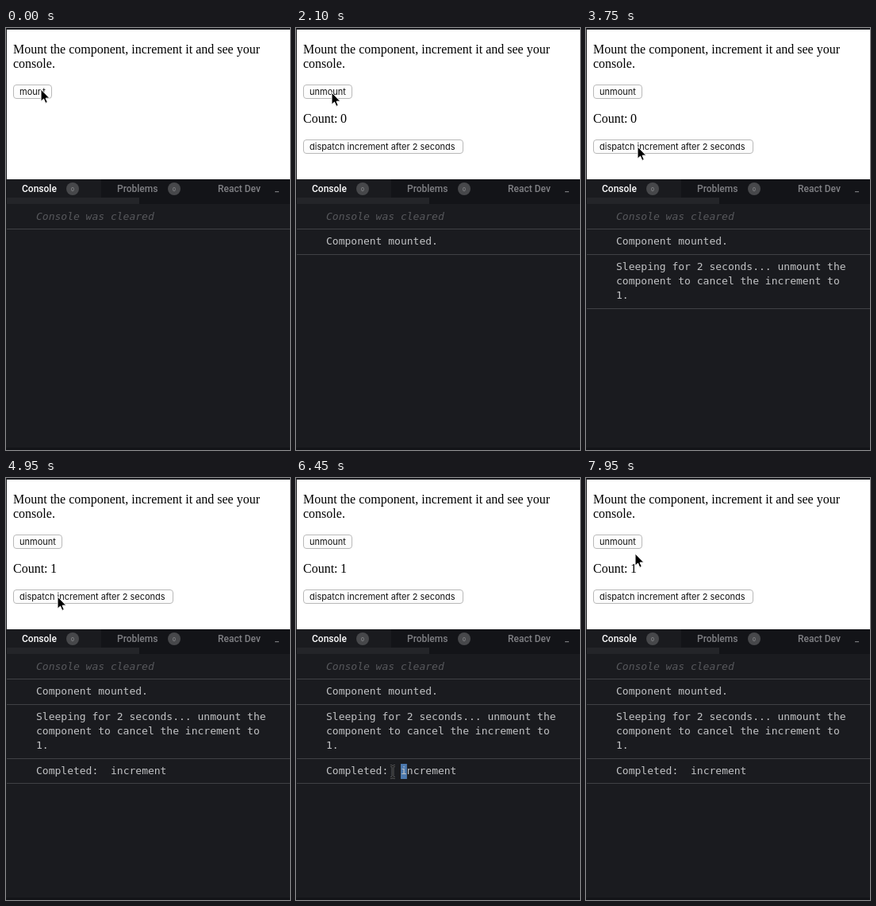
An HTML page that plays this animation: 358 by 530 pixels, repeating every 8000 ms.

```html
<!DOCTYPE html>
<html lang="en">
<head>
<meta charset="utf-8">
<title>Mount and increment</title>
<style>
html, body { margin: 0; width: 100%; height: 100%; overflow: hidden; background: #1a1b1f; }
svg { display: block; }

.page { font: 16px "Liberation Serif", serif; fill: #000; }
.label { font: 11px Inter, sans-serif; fill: #111; }
.tab { font: 500 12px Roboto, sans-serif; fill: #808185; }
.badge { font: 7px Roboto, sans-serif; fill: #929396; text-anchor: middle; }
.log { font: 13px "DejaVu Sans Mono", monospace; fill: #c3c4c6; }
.cleared { font-style: italic; fill: #57585c; }
.rule { fill: #404145; }
.btn { fill: url(#plain); stroke: #b9b9b9; }
.btn.blue { fill: url(#pressed); stroke: #2a5fd0; }
.sel { fill: #4b78ad; transform-box: fill-box; }

/* One 8 s clock for everything: 1% = 80 ms */
.anim { animation: 8s step-end infinite; }
.before { animation-name: before; }
.mountPress { animation-name: mountPress; }
.mounted { animation-name: mounted; }
.mountLog { animation-name: mountLog; }
.unmountPress { animation-name: unmountPress; }
.dispatchPress { animation-name: dispatchPress; }
.sleeping { animation-name: sleeping; }
.zero { animation-name: zero; }
.done { animation-name: done; }
.arrow { animation-name: arrow; }
.beam { animation-name: beam; }
.cursor { animation-name: move; animation-timing-function: linear; }
.selRight { transform-origin: left; animation-name: selRight; }
.selLeft { transform-origin: right; animation-name: selLeft; }

@keyframes before { 0% { opacity: 1 } 18.1%, 100% { opacity: 0 } }
@keyframes mounted { 0% { opacity: 0 } 18.1%, 100% { opacity: 1 } }
@keyframes mountPress { 0% { opacity: 0 } 17.48% { opacity: 1 } 18.1%, 100% { opacity: 0 } }
@keyframes unmountPress { 0% { opacity: 0 } 18.1% { opacity: .5 } 18.72%, 100% { opacity: 0 } }
@keyframes mountLog { 0% { opacity: 0 } 18.72%, 100% { opacity: 1 } }
@keyframes dispatchPress {
  0% { opacity: 0 }
  35.6% { opacity: 1 }
  36.8% { opacity: .5 }
  37.48%, 100% { opacity: 0 }
}
@keyframes sleeping { 0% { opacity: 0 } 36.85%, 100% { opacity: 1 } }
@keyframes zero { 0% { opacity: 1 } 61.85%, 100% { opacity: 0 } }
@keyframes done { 0% { opacity: 0 } 61.85%, 100% { opacity: 1 } }
@keyframes arrow { 0% { opacity: 1 } 74.3% { opacity: 0 } 93.9%, 100% { opacity: 1 } }
@keyframes beam { 0% { opacity: 0 } 74.3% { opacity: 1 } 93.9%, 100% { opacity: 0 } }

@keyframes move {
  0% { transform: translate(44px, 77px) }
  1.25%, 25.6% { transform: translate(45px, 80px) }
  26.25% { transform: translate(45px, 81px); animation-timing-function: ease-in-out }
  33.75%, 69.4% { transform: translate(65px, 149px); animation-timing-function: ease-in-out }
  75% { transform: translate(124px, 369px) }
  77.5%, 78.75% { transform: translate(214px, 371px) }
  80.6% { transform: translate(122.5px, 369px); animation-timing-function: ease-out }
  88.75% { transform: translate(38.5px, 367px) }
  89.4%, 93.2% { transform: translate(38.5px, 366px); animation-timing-function: ease-in }
  96.25% { transform: translate(70px, 230px); animation-timing-function: ease-out }
  99.3%, 100% { transform: translate(62px, 95px) }
}
@keyframes selRight {
  0% { transform: scaleX(0) }
  75% { transform: scaleX(0); animation-timing-function: steps(9) }
  77.5% { transform: scaleX(1) }
  79.3% { transform: scaleX(1); animation-timing-function: steps(8) }
  80.55% { transform: scaleX(.1111) }
  81.2%, 100% { transform: scaleX(0) }
}
@keyframes selLeft {
  0% { transform: scaleX(0) }
  81.2% { transform: scaleX(0); animation-timing-function: steps(11) }
  87.5% { transform: scaleX(1) }
  89.95%, 100% { transform: scaleX(0) }
}
</style>
</head>
<body>
<svg width="358" height="530" viewBox="0 0 358 530">
  <defs>
    <linearGradient id="plain" x2="0" y2="1">
      <stop stop-color="#fff"/><stop offset="1" stop-color="#fbfbfb"/>
    </linearGradient>
    <linearGradient id="pressed" x2="0" y2="1">
      <stop stop-color="#6298f3"/><stop offset="1" stop-color="#1f55dc"/>
    </linearGradient>
  </defs>

  <!-- page -->
  <rect width="358" height="530" fill="#1a1b1f"/>
  <rect x="1" y="2" width="357" height="188" fill="#fff"/>
  <g class="page">
    <text x="9" y="32">Mount the component, increment it and see your</text>
    <text x="9" y="50">console.</text>
  </g>

  <g class="anim before">
    <rect class="btn" x="9.5" y="71.5" width="48" height="17" rx="3.5"/>
    <rect class="btn blue anim mountPress" x="9.5" y="71.5" width="48" height="17" rx="3.5"/>
    <text class="label" x="17" y="84">mount</text>
  </g>

  <g class="anim mounted">
    <rect class="btn" x="9.5" y="71.5" width="61" height="17" rx="3.5"/>
    <rect class="btn blue anim unmountPress" x="9.5" y="71.5" width="61" height="17" rx="3.5"/>
    <text class="label" x="17" y="84">unmount</text>
    <g class="page">
      <text x="9" y="119">Count:</text>
      <text class="anim zero" x="56" y="119">0</text>
      <text class="anim done" x="56" y="119">1</text>
    </g>
    <rect class="btn" x="9.5" y="140.5" width="201" height="17" rx="3.5"/>
    <rect class="btn blue anim dispatchPress" x="9.5" y="140.5" width="201" height="17" rx="3.5"/>
    <text class="label" x="17" y="153">dispatch increment after 2 seconds</text>
  </g>

  <!-- tabs -->
  <rect y="190" width="358" height="31" fill="#131418"/>
  <rect x="1" y="190" width="119" height="23" fill="#1a1b1f"/>
  <rect x="1" y="213" width="167" height="8" fill="#242529"/>
  <text class="tab" x="20" y="206" style="fill:#fff">Console</text>
  <text class="tab" x="140" y="206">Problems</text>
  <text class="tab" x="267" y="206">React Dev</text>
  <g fill="#47484b">
    <circle cx="84" cy="202" r="8"/>
    <circle cx="212" cy="202" r="8"/>
  </g>
  <text class="badge" x="84" y="204.5">0</text>
  <text class="badge" x="212" y="204.5">0</text>
  <rect x="339" y="205" width="5" height="1.2" fill="#77787b"/>

  <!-- console -->
  <text class="log cleared" x="38" y="241">Console was cleared</text>
  <rect class="rule" x="1" y="252" width="357" height="1"/>
  <g class="anim mountLog">
    <text class="log" x="38" y="272">Component mounted.</text>
    <rect class="rule" x="1" y="284" width="357" height="1"/>
  </g>
  <g class="anim sleeping log">
    <text x="38" y="304">Sleeping for 2 seconds... unmount the</text>
    <text x="38" y="322">component to cancel the increment to</text>
    <text x="38" y="340">1.</text>
    <rect class="rule" x="1" y="352" width="357" height="1"/>
  </g>
  <rect class="sel anim selLeft" x="38" y="359" width="86" height="19"/>
  <rect class="sel anim selRight" x="132" y="359" width="70.4" height="19"/>
  <g class="anim done log">
    <text x="38" y="372">Completed:</text>
    <text x="132" y="372">increment</text>
    <rect class="rule" x="1" y="383" width="357" height="1"/>
  </g>
  <rect y="527" width="358" height="3" fill="#131418"/>

  <!-- pointer -->
  <g class="anim cursor">
    <path class="anim arrow" d="M0 0V15.2L3.5 12L5.8 17.4L8.3 16.3L6 11.1H10.8Z"
      fill="#000" stroke="#fff" stroke-linejoin="round"/>
    <g class="anim beam" fill="none">
      <path id="ibeam" d="M-3 -7.5Q0 -7.5 0 -5.5V5.5Q0 7.5 -3 7.5M3 -7.5Q0 -7.5 0 -5.5M0 5.5Q0 7.5 3 7.5"
        stroke="#86878a" stroke-width="2.6"/>
      <use href="#ibeam" style="display:none"/>
      <path d="M-3 -7.5Q0 -7.5 0 -5.5V5.5Q0 7.5 -3 7.5M3 -7.5Q0 -7.5 0 -5.5M0 5.5Q0 7.5 3 7.5"
        stroke="#111" stroke-width="1.3"/>
    </g>
  </g>
</svg>
</body>
</html>
```
